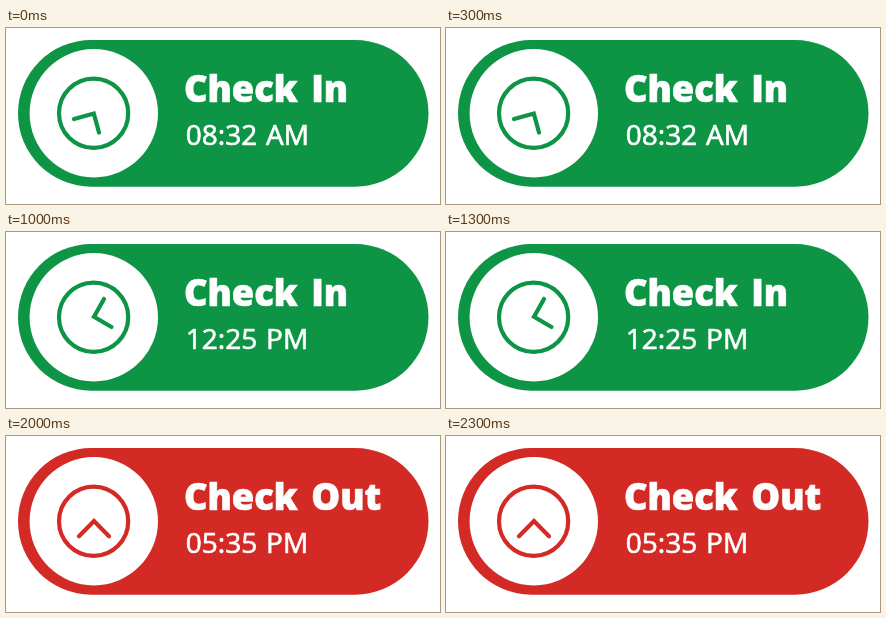
Write an HTML page that moves like this. It is 434x176 px and loops after 2.5 s.

```html
<!DOCTYPE html>
<html>
<head>
<meta charset="utf-8">
<style>
  html, body { margin: 0; width: 100%; height: 100%; overflow: hidden; background: #fff; }
  svg { display: block; }
  text { font-family: "Open Sans", sans-serif; fill: #fff; stroke: #fff; stroke-width: .7; }
  #title { font-size: 36.3px; font-weight: 800; word-spacing: 4px; }
  #time { font-size: 28px; word-spacing: 1.5px; }
</style>
</head>
<body>
<svg width="434" height="176" viewBox="0 0 434 176">
  <rect id="pill" x="12" y="12" width="410.5" height="146.7" rx="73.35"/>
  <circle cx="87.8" cy="85.2" r="64.2" fill="#fff"/>
  <g id="clock" fill="none" stroke-width="4.2" stroke-linecap="round">
    <circle cx="87.6" cy="85.2" r="34.6"/>
    <polyline id="hands"/>
  </g>
  <text id="title" x="178" y="74.4"></text>
  <text id="time" x="179.8" y="116.8"></text>
</svg>
<script>
const STEP = 500;
const GREEN = '#0d9445', RED = '#d42a25';
const states = [
  { time: '08:32 AM', hands: '68,91 87.8,85.5 93,104.5' },
  { time: '10:06 AM', hands: '69.5,73 88,83.5 98,66' },
  { time: '12:25 PM', hands: '98,67 88,84.7 105.5,95' },
  { time: '02:25 PM', hands: '78,102.5 88,84.7 105.5,95' },
  { time: '05:35 PM', hands: '73,100.2 88,85 103,100.2', out: true },
];
const $ = id => document.getElementById(id);

function draw(now) {
  const { time, hands, out } = states[Math.floor(now / STEP) % states.length];
  const color = out ? RED : GREEN;
  $('pill').setAttribute('fill', color);
  $('clock').setAttribute('stroke', color);
  $('hands').setAttribute('points', hands);
  $('title').textContent = out ? 'Check Out' : 'Check In';
  $('time').textContent = time;
}

const start = performance.now();
function tick() {
  draw(performance.now() - start);
  requestAnimationFrame(tick);
}
tick();
</script>
</body>
</html>
```
